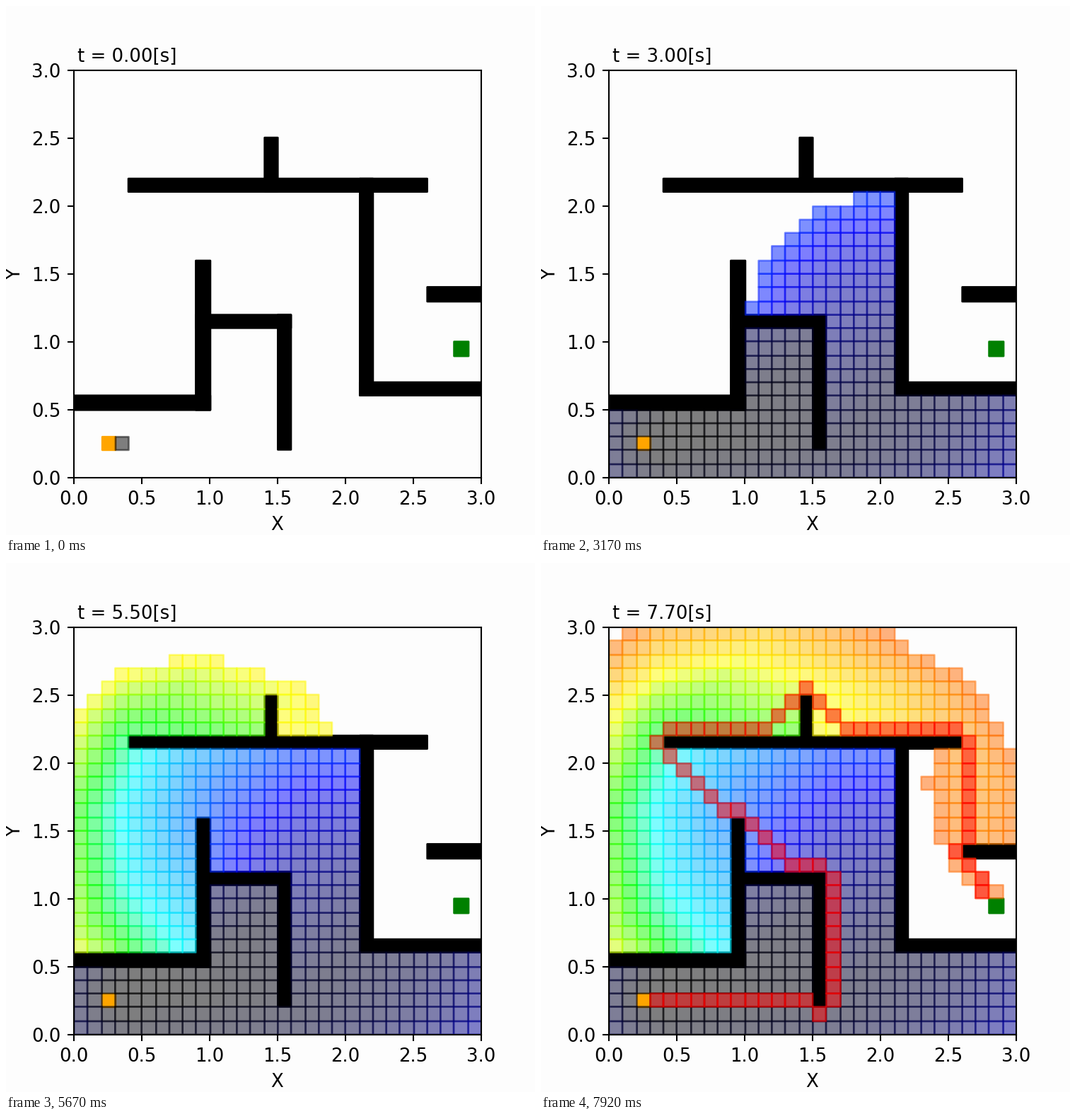
Recreate the animation shown at these times as a matplotlib script. Size 748 by 748 pixels, loop 8000 ms.

```python
import math

import numpy as np
import matplotlib.pyplot as plt
from matplotlib.animation import FuncAnimation
from matplotlib.collections import PolyCollection
from matplotlib.colors import LinearSegmentedColormap

SIZE, DPI = 748, 187
N = 30
STEP = 308 / 30  # cell width on the coarse pixel raster
START, GOAL = (2, 2), (28, 9)
WEIGHT = 0.91    # share of the remaining distance in the cost
SLOTS, LOOP_MS = 96, 8000
FOUND_STEP = 72
PAPER = "#fdfdfd"

# column, row, width, height in cells
WALLS = [(0, 5, 10, 1), (9, 5, 1, 11), (9, 11, 7, 1), (15, 2, 1, 10),
         (4, 21, 22, 1), (14, 21, 1, 4), (21, 6, 1, 16), (21, 6, 9, 1),
         (26, 13, 4, 1)]

COST_RANGE = (25, 86)
STOPS = {25: "black", 44: "blue", 63: "cyan", 68: "lime", 73.5: "yellow",
         86: "red"}


def search():
    """A* on the grid: visited cells with their costs, and the route."""
    blocked = {(x + i, y + j) for x, y, w, h in WALLS
               for i in range(w) for j in range(h)}
    g, parent = {START: 0.0}, {}
    todo, closed = {START: WEIGHT * math.dist(START, GOAL)}, {}
    while GOAL not in closed:
        cur = min(todo, key=todo.get)
        closed[cur] = todo.pop(cur)
        for x in range(max(cur[0] - 1, 0), min(cur[0] + 2, N)):
            for y in range(max(cur[1] - 1, 0), min(cur[1] + 2, N)):
                nxt = (x, y)
                if nxt in blocked or nxt in closed:
                    continue
                new = g[cur] + math.dist(cur, nxt)
                if new < g.get(nxt, math.inf) - 1e-9:
                    g[nxt], parent[nxt] = new, cur
                    todo[nxt] = new + WEIGHT * math.dist(nxt, GOAL)
    route, cell = [], parent[GOAL]
    while cell != START:
        route.append(cell)
        cell = parent[cell]
    del closed[START], closed[GOAL]
    return list(closed), list(closed.values()), route


def box(x, y, w=1, h=1):
    corners = np.array([(x, y), (x + w, y), (x + w, y + h), (x, y + h)])
    return (np.round(corners * STEP) + (0.4, 0)) / STEP / 10


def add_boxes(boxes, color, z):
    group = PolyCollection(boxes, facecolors=color, edgecolors=color,
                           linewidths=1, zorder=z)
    group.set_snap(False)
    ax.add_collection(group, autolim=False)
    return group


plt.rcParams["font.family"] = "DejaVu Sans"
plt.rcParams["font.size"] = 10

fig = plt.figure(figsize=(SIZE / DPI, SIZE / DPI), dpi=DPI, facecolor=PAPER)
ax = fig.add_axes([95.6 / SIZE, 81.34 / SIZE, 0.77, 0.77], facecolor=PAPER)
ticks = np.arange(0, 3.1, 0.5)
ax.set(xlim=(0, 3), ylim=(0, 3), xticks=ticks, yticks=ticks,
       xlabel="X", ylabel="Y")
clock = ax.text(0.01, 1.02, "", transform=ax.transAxes)

cells, costs, path = search()
low, high = COST_RANGE
cmap = LinearSegmentedColormap.from_list(
    "cost", [((c - low) / (high - low), name) for c, name in STOPS.items()])
colors = cmap((np.array(costs) - low) / (high - low), alpha=0.5)
boxes = [box(*c) for c in cells]

add_boxes([box(*w) for w in WALLS], "black", 1.1)
add_boxes([box(*START)], "orange", 1.2)
add_boxes([box(*GOAL)], "green", 1.2)
visited = add_boxes([], "none", 1.5)
route = add_boxes([box(*c) for c in path], (1, 0, 0, 0.5), 1.6)


def draw(k):
    # one slot in six repeats the picture before it
    step = max(0, k - (k + 3) // 6 - 2)
    count = 10 * step - 6 if step else min(k + 1, 3)
    found = step >= FOUND_STEP
    if found:
        count = len(boxes)
    visited.set_verts(boxes[:count])
    visited.set_facecolor(colors[:count])
    visited.set_edgecolor(colors[:count])
    route.set_visible(found)
    clock.set_text(f"t = {step / 10:.2f}[s]")
    return visited, route, clock


anim = FuncAnimation(fig, draw, frames=SLOTS, interval=LOOP_MS / SLOTS,
                     repeat=True, repeat_delay=0, blit=False)
plt.show()
```
